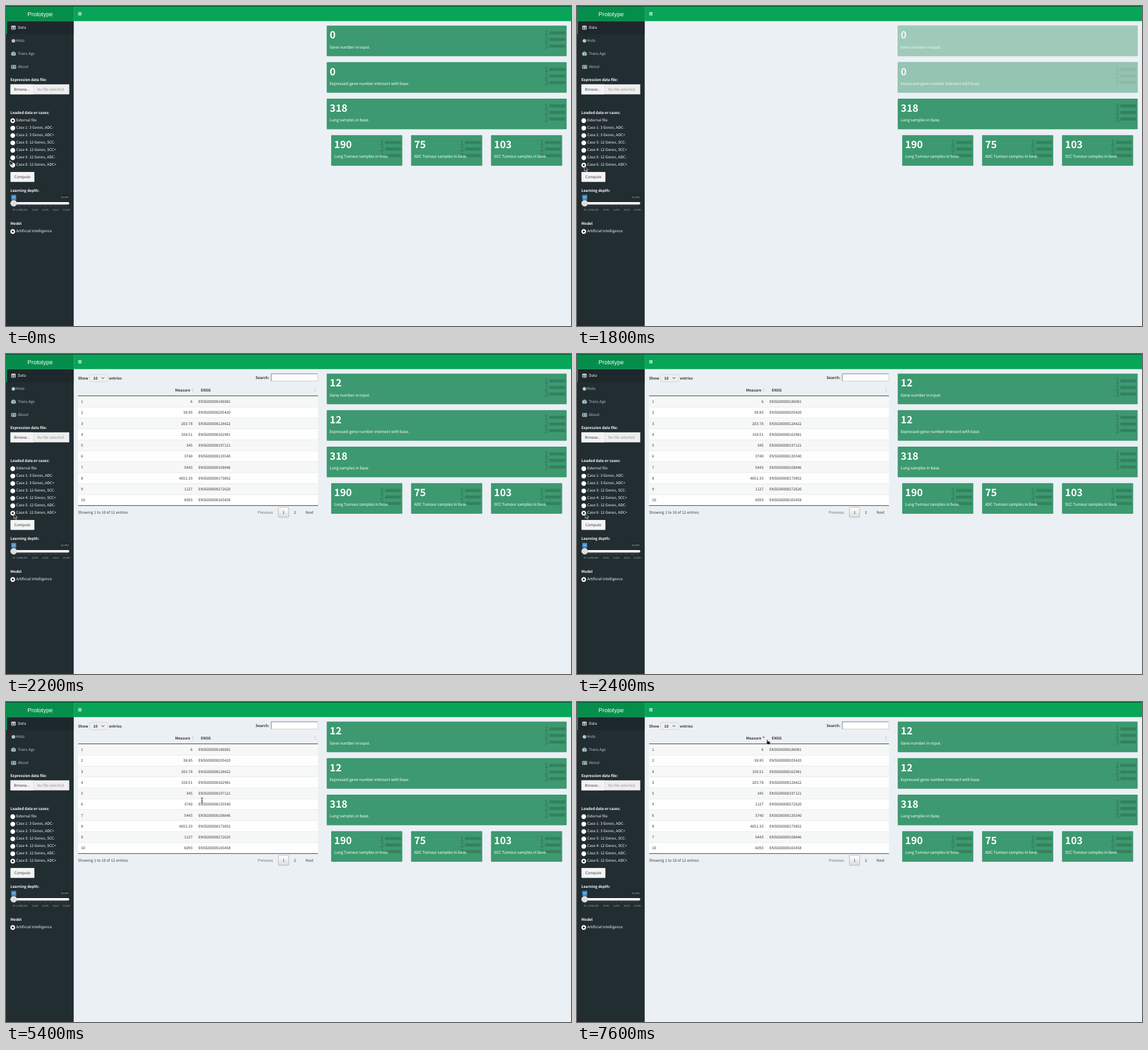
Animation of 994 by 563 pixels, one loop 8 s. Source, as an HTML page:

```html
<!DOCTYPE html>
<html lang="en">
<head>
<meta charset="utf-8">
<title>Prototype dashboard</title>
<style>
html, body { margin: 0; width: 100%; height: 100%; overflow: hidden; background: #ebf0f4; }
svg { display: block; width: 994px; height: 563px; }
text {
  font: 6.49px "Noto Sans CJK JP", "Noto Sans CJK SC", "Noto Sans CJK KR", "Noto Sans", sans-serif;
  fill: #333; text-rendering: geometricPrecision; white-space: pre;
  letter-spacing: .03px; word-spacing: .1px;
}
.side { fill: #fff; }
.menu { fill: #b8c7ce; }
.b { font-weight: 700; }
.b, .n, .brand, .count, .num, .tick, .tag { letter-spacing: 0; word-spacing: 0; }
.brand { font: 10.35px "Liberation Sans", Arial, sans-serif; fill: #fff; }
.count { font-size: 17.6px; font-weight: 700; fill: #fff; }
.label { font-size: 6.95px; fill: #fff; letter-spacing: -.055px; word-spacing: 0; }
.num { font-size: 13.2px; font-weight: 900; fill: #000; }
.tick { font-size: 4.17px; fill: #a3abae; }
.tag { font-size: 4.63px; fill: #fff; }
.busy { font-size: 7.79px; }
.r { text-anchor: end; }
.m { text-anchor: middle; }

.an { animation: 8s step-end infinite; }
.external { animation-name: external; }
.case6 { animation-name: case6; }
.before { animation-name: before; }
.after { animation-name: after; }
.veil { animation-name: veil; }
.steady { animation-name: steady; }
.wait { animation-name: wait; }
.table { animation-name: table; }
.plain { animation-name: plain; }
.sorted { animation-name: sorted; }
.hover { animation-name: hover; }
.arrow { animation-name: arrow; }
.beam { animation-name: beam; }
.hand { animation-name: hand; }
.path { animation-name: path; }

@keyframes external { 0% { visibility: visible } 15%, 100% { visibility: hidden } }
@keyframes case6 { 0% { visibility: hidden } 15%, 100% { visibility: visible } }
@keyframes before { 0% { visibility: visible } 25%, 100% { visibility: hidden } }
@keyframes after { 0% { visibility: hidden } 25%, 100% { visibility: visible } }
@keyframes veil { 0% { visibility: hidden } 22.5% { visibility: visible } 25%, 100% { visibility: hidden } }
@keyframes steady { 0% { visibility: visible } 22.5% { visibility: hidden } 25%, 100% { visibility: visible } }
@keyframes wait { 0% { visibility: hidden } 25% { visibility: visible } 27.5%, 100% { visibility: hidden } }
@keyframes table { 0% { visibility: hidden } 27.5%, 100% { visibility: visible } }
@keyframes plain { 0% { visibility: hidden } 27.5% { visibility: visible } 90%, 100% { visibility: hidden } }
@keyframes sorted { 0% { visibility: hidden } 90%, 100% { visibility: visible } }
@keyframes hover { 0% { visibility: hidden } 47.5% { visibility: visible } 67.5%, 100% { visibility: hidden } }
@keyframes arrow { 0% { visibility: visible } 45%, 100% { visibility: hidden } }
@keyframes beam { 0% { visibility: hidden } 45% { visibility: visible } 77.5%, 100% { visibility: hidden } }
@keyframes hand { 0% { visibility: hidden } 77.5%, 100% { visibility: visible } }
@keyframes path {
  0% { transform: translate(7px, 272px); animation-timing-function: steps(4) }
  10% { transform: translate(13px, 282px) }
  25% { transform: translate(13px, 282px); animation-timing-function: steps(2) }
  30% { transform: translate(14.5px, 280.5px) }
  35% { transform: translate(14.5px, 280.5px); animation-timing-function: steps(2) }
  40% { transform: translate(70px, 306px); animation-timing-function: steps(3) }
  47.5% { transform: translate(349px, 199px) }
  65% { transform: translate(349px, 199px); animation-timing-function: steps(5) }
  77.5% { transform: translate(328px, 67.5px) }
  85% { transform: translate(328px, 67.5px); animation-timing-function: steps(4) }
  95%, 100% { transform: translate(333.5px, 66px) }
}
</style>
</head>
<body>
<svg id="stage" viewBox="0 0 994 563" xmlns="http://www.w3.org/2000/svg"></svg>
<script>
const BACK = '#ebf0f4';
const text = (x, y, s, cls = '') => `<text x="${x}" y="${y}" class="${cls}">${s}</text>`;
const rect = (x, y, w, h, fill, more = '') =>
  `<rect x="${x}" y="${y}" width="${w}" height="${h}" fill="${fill}" ${more}/>`;
const path = (d, fill, more = '') => `<path d="${d}" fill="${fill}" ${more}/>`;
const show = (name, body) => `<g class="an ${name}">${body}</g>`;
const fade = (alpha, body) => `<g opacity="${alpha}">${body}</g>`;
const range = n => [...Array(n).keys()];

function header() {
  return rect(0, 0, 119.1, 26.6, '#058e4b') + rect(119.1, 0, 875, 26.6, '#07a558') +
    rect(0, 0, 994, .8, '#0c3322') +
    text(60, 18.2, 'Prototype', 'brand m') +
    [11, 13.1, 15.2].map(y => rect(127, y, 6, 1.1, '#fff')).join('');
}

function menuIcons() {
  const dark = '#1e282c', grey = '#b8c7ce';
  let s = rect(9.4, 34.8, 7.4, 6.6, '#fff', 'rx=".8"');
  for (const x of [10.3, 13.5]) for (const y of [36.6, 39]) s += rect(x, y, 2.4, 1.6, dark);
  s += `<circle cx="13" cy="61.3" r="3.1" fill="${grey}"/>`;
  s += path('M10.2 87.3A4.1 4.1 0 1 1 16.2 87.3Z', grey) +
    path('M12.8 86L14.9 82.2M10.4 84.5h.8M11.4 82.3l.5.5M13.2 81.3v.8M15.3 84.6h.8', 'none',
      'stroke="#222d32" stroke-width=".8"');
  s += rect(9.2, 103.8, 8.5, 6.6, grey, 'rx=".8"') + rect(9.2, 104.7, 8.5, .5, '#222d32') +
    '<circle cx="11.6" cy="106.7" r="1" fill="#222d32"/>' +
    path('M10 109.3q1.6-2 3.2 0Z', '#222d32') +
    [106, 107.3, 108.6].map(y => rect(14.1, y, 2.6, .5, '#222d32')).join('');
  return s;
}

function radio(y, label, dot) {
  return `<circle cx="11.9" cy="${y + .8}" r="4.2" fill="#fff"/>` +
    (dot === undefined ? '' : `<circle cx="11.9" cy="${y + .8}" r="1.75" fill="#1c1f20" class="${dot}"/>`) +
    text(18, y + 2.3, label, 'side');
}

function slider() {
  let s = rect(7.8, 345.1, 103.5, 4.2, '#fff', 'rx="2"');
  for (const i of range(41))
    s += rect(14 + i * 2.3, 350.3, .4, i % 4 ? 2 : 3.6, '#a3abae', 'opacity=".6"');
  const marks = { '50': 0, '1,045': 1, '2,040': 2, '4,030': 4, '6,020': 6, '8,010': 8, '10,000': 10 };
  for (const m in marks) s += text(14 + marks[m] * 9.22, 360, m, 'tick m');
  s += rect(94.8, 332.2, 16.5, 7.4, '#1d272b', 'rx="1.2"') + fade(.65, text(110, 337.7, '10,000', 'tag r'));
  s += rect(9.2, 332.2, 8.8, 9, '#428bca', 'rx="1.3"') + text(13.6, 338.3, '50', 'tag m');
  return s + '<circle cx="13.5" cy="347" r="5.5" fill="#dedede" stroke="#b9bcbd" stroke-width=".5"/>';
}

function sidebar() {
  const cases = ['3 Genes, ADC-', '3 Genes, ADC+', '12 Genes, SCC-', '12 Genes, SCC+', '12 Genes, ADC-', '12 Genes, ADC+'];
  return rect(0, 26.6, 119.1, 536.4, '#222d32') + rect(0, 26.6, 119.1, 22.8, '#1e282c') +
    rect(0, 26.6, 1.6, 22.8, '#00a65a') + menuIcons() +
    text(21, 40.4, 'Data', 'side') + text(17, 63.4, 'Histo', 'menu') +
    text(21, 86.4, 'Trans.Age', 'menu') + text(21, 109.4, 'About', 'menu') +
    text(7.8, 132.3, 'Expression data file:', 'side b') +
    rect(7.8, 137.8, 103.5, 17.6, '#eeeeee') + rect(7.8, 137.8, 40.5, 17.6, '#f4f4f4') +
    rect(48, 137.8, .5, 17.6, '#ccc') +
    text(14, 149, 'Browse...') + fade(.5, text(55, 149, 'No file selected')) +
    text(7.8, 190.1, 'Loaded data or cases:', 'side b') +
    radio(201, 'External file', 'an external') +
    cases.map((c, i) => radio(214.03 + i * 13.03, `Case ${i + 1}: ${c}`, i == 5 ? 'an case6' : undefined)).join('') +
    rect(7.8, 292, 42.2, 17.6, '#f4f4f4', 'rx="1.3"') +
    text(28.9, 303.3, 'Compute', 'm') +
    text(7.8, 326.6, 'Learning depth:', 'side b') + slider() +
    text(7.8, 385, 'Model', 'side b') + radio(396, 'Artificial Intelligence', '');
}

function listIcon(right, top) {
  return fade(.15, range(3).map(i =>
    text(right - 39.6, top + 17.7 + i * 11.5, i + 1, 'num') +
    rect(right - 30.4, top + 10.2 + i * 11.5, 28, 5.4, '#000', 'rx="1"')).join(''));
}

function box(x, y, w, count, label, steadyIcon) {
  const icon = listIcon(x + w, y);
  return rect(x, y + .5, w, 53.8, '#000', 'rx="1" opacity=".1"') +
    rect(x, y, w, 53.8, '#3d9970', 'rx="1"') +
    (steadyIcon ? show('steady', icon) : icon) +
    count + text(x + 5.2, y + 40.1, label, 'label');
}

function boxes() {
  const x = 564.3, w = 422, ys = [34.5, 98.7, 162.9];
  const n = (x, y, s, cls = '') => text(x + 5.2, y + 22.8, s, 'count ' + cls);
  const change = y => n(x, y, 0, 'an before') + n(x, y, 12, 'an after');
  const veil = (y, alpha) => rect(x, y, w, 54.3, BACK, `class="an veil" fill-opacity="${alpha}"`);
  const small = [[190, 'Lung'], [75, 'ADC'], [103, 'SCC']];
  return box(x, ys[0], w, change(ys[0]), 'Gene number in input.', true) + veil(ys[0], .56) +
    box(x, ys[1], w, change(ys[1]), 'Expressed-gene number intersect with base.') + veil(ys[1], .5) +
    box(x, ys[2], w, n(x, ys[2], 318), 'Lung samples in base.') +
    small.map(([count, name], i) => {
      const left = 572.1 + i * 140.6, top = 227.2;
      return box(left, top, 125.1, n(left, top, count), name + ' Tumour samples in base.');
    }).join('');
}

const rows = [
  ['6', '186081'], ['38.85', '205420'], ['203.78', '128422'], ['158.51', '162981'], ['345', '197121'],
  ['3740', '135540'], ['5443', '108846'], ['4651.33', '173852'], ['1127', '272620'], ['6093', '165458']
].map(([value, id], i) => ({ n: i + 1, value, id: 'ENSG00000' + id }));
const rowY = i => 74 + i * 19.27;

const rowTexts = list => list.map((r, i) => {
  const y = rowY(i) + 12;
  return text(132, y, r.n, 'n') + text(328, y, r.value, 'n r') + text(338.5, y, r.id, 'n');
}).join('');

const sortIcon = x => path(`M${x - 2} 62.3h4l-2-2.8ZM${x - 2} 63.8h4l-2 2.8Z`, '#d3d7dc');

function controls() {
  return text(126.8, 44.6, 'Show', 'b') +
    rect(147.2, 36, 32, 12.7, '#efefef', 'rx="2" stroke="#b5b8ba" stroke-width=".5"') +
    text(153.4, 44.6, '10', 'b') +
    path('M168.2 41.1l2.4 2.4 2.4-2.4', 'none', 'stroke="#222" stroke-width="1"') +
    text(181.2, 44.6, 'entries', 'b') +
    text(463, 43.6, 'Search:', 'b r') +
    rect(466.3, 34.5, 82.5, 13.6, '#d4d6d8') + rect(466.3, 34.5, 81.8, 12.9, '#767676') +
    rect(467.2, 35.4, 80.9, 12, '#fff');
}

function waiting() {
  return text(361, 65.7, 'Measure', 'b') + text(406, 65.7, 'ENSG', 'b') +
    rect(126.8, 44, 422, 20.4, 'url(#haze)') +
    text(338, 64, 'Processing...', 'busy m') + rect(126.8, 73.2, 422, 1.3, '#111');
}

function table() {
  let s = rows.map((r, i) => rect(126.8, rowY(i), 422, 19.27, i % 2 ? '#fdfefd' : '#f6f8f7') +
    (i ? rect(126.8, rowY(i) - .25, 422, .5, '#dadcdd') : '')).join('');
  s += show('hover', rect(126.8, rowY(6) + .25, 422, 18.77, '#f0f2f1'));
  s += text(324.3, 65.7, 'Measure', 'b r') + text(342.7, 65.7, 'ENSG', 'b') + sortIcon(544) +
    rect(126.8, 73.3, 422, .8, '#111') + rect(126.8, 266.3, 422, .8, '#111');
  const sorted = [...rows].sort((a, b) => a.value - b.value);
  s += show('plain', sortIcon(328.5) + rowTexts(rows));
  s += show('sorted', path('M326 63h4.6l-2.3-3.6Z', '#7f86dc') + rowTexts(sorted));
  return s + text(126.8, 280.6, 'Showing 1 to 10 of 12 entries') +
    fade(.75, text(443, 280.8, 'Previous')) +
    rect(479.2, 269.7, 18.2, 17.6, 'url(#page)', 'rx="1" stroke="#979797" stroke-width=".6"') +
    text(488.3, 280.8, '1', 'n m') + text(508.4, 280.8, '2', 'n m') + text(527, 280.8, 'Next');
}

function cursor() {
  const edge = 'stroke="#fff" stroke-width=".7" stroke-linejoin="round"';
  const bar = 'M-2-4q1.6 0 2 .8 .4-.8 2-.8M0-3.4V3.4M-2 4q1.6 0 2-.8 .4.8 2 .8M-1 .6h2';
  return show('path',
    show('arrow', path('M0 0V8.6L2.1 6.8 3.6 10 5 9.4 3.5 6.3H6.3Z', '#15191b', edge)) +
    show('beam', path(bar, 'none', 'stroke="#fff" stroke-width="1.8"') +
      path(bar, 'none', 'stroke="#111" stroke-width=".9"')) +
    show('hand', path('M.3.8Q1.2-.2 2 .8L2.5 3.2 5.4 3.8Q6.4 4 6.3 5.2L5.8 8.6H2L-.6 5.6Q-.6 4.4.9 5Z', '#0c0c0c',
      'stroke="#fff" stroke-width=".4"')));
}

const stops = list => list.map(([at, color, alpha = 1]) =>
  `<stop offset="${at}" stop-color="${color}" stop-opacity="${alpha}"/>`).join('');

document.getElementById('stage').innerHTML =
  `<defs><linearGradient id="haze">${stops([[0, '#fff', 0], [.25, '#fff', .9], [.75, '#fff', .9], [1, '#fff', 0]])}</linearGradient>` +
  `<linearGradient id="page" x2="0" y2="1">${stops([[0, '#fff'], [1, '#dcdcdc']])}</linearGradient></defs>` +
  rect(0, 0, 994, 563, BACK) + sidebar() + header() + boxes() +
  show('after', controls()) + show('wait', waiting()) + show('table', table()) + cursor();
</script>
</body>
</html>
```
